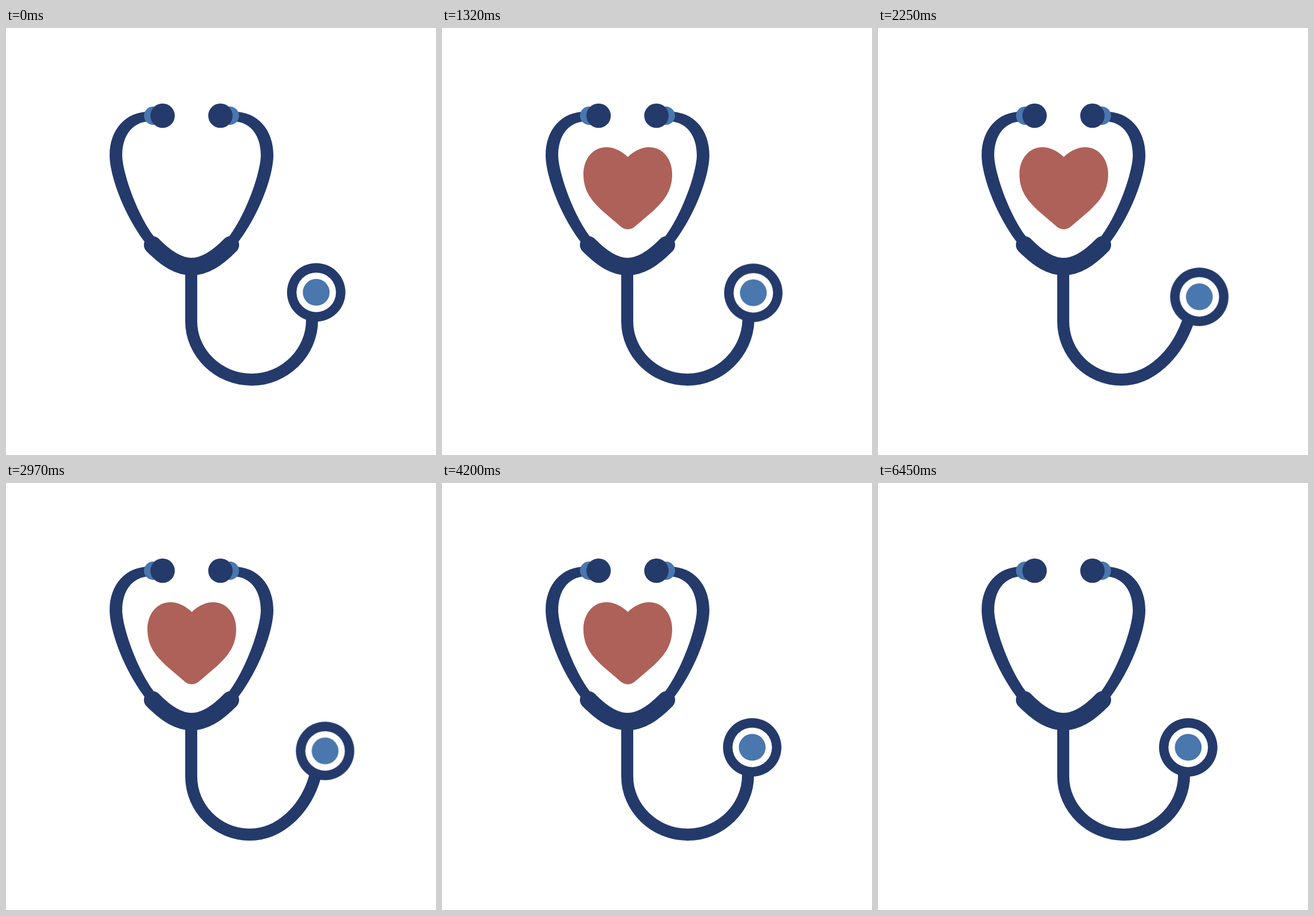
An HTML page for the animation above (7200 ms loop, 751 by 745 pixels).

```html
<!DOCTYPE html>
<html lang="en">
<head>
<meta charset="utf-8">
<title>Stethoscope</title>
<style>
  html, body { margin: 0; width: 100%; height: 100%; overflow: hidden; background: #fff; }
  svg { display: block; width: 100%; height: 100%; }
  .navy { fill: #243a6b; }
  .blue { fill: #4a77ae; }
  .line { fill: none; stroke: #243a6b; }

  .heart {
    fill: #ae6158;
    transform-origin: 324.5px 279.5px;
    animation: pop 7.2s infinite;
  }
  .disc { animation: swing 7.2s infinite; }
  .tube { stroke-width: 21; animation: bend 7.2s infinite; }

  @keyframes pop {
    0%      { transform: scale(0); }
    6.25%   { transform: scale(0); animation-timing-function: cubic-bezier(.61, 1, .88, 1); }
    12.5%   { transform: scale(1.2); animation-timing-function: cubic-bezier(.12, 0, .39, 0); }
    18.333% { transform: scale(1); }
    81.25%  { transform: scale(1); animation-timing-function: cubic-bezier(.61, 1, .88, 1); }
    85.417% { transform: scale(1.19); animation-timing-function: cubic-bezier(.12, 0, .39, 0); }
    89.583%, 100% { transform: scale(0); }
  }
  @keyframes swing {
    0%, 14.583%, 58.333%, 100% {
      transform: translate(0, 0);
      animation-timing-function: cubic-bezier(.37, 0, .63, 1);
    }
    33.333% {
      transform: translate(20px, 8px);
      animation-timing-function: cubic-bezier(.37, 0, .63, 1);
    }
  }
  @keyframes bend {
    0%, 14.583%, 58.333%, 100% {
      d: path("M323.5 425L323.5 512C323.5 567 371 613.5 429 613.5C487 613.5 534.5 566 534.5 510L534.5 501");
      animation-timing-function: cubic-bezier(.37, 0, .63, 1);
    }
    33.333% {
      d: path("M323.5 425L323.5 512C323.5 567 368 613.5 425 613.5C476 613.5 520 570 541 514L544.5 505");
      animation-timing-function: cubic-bezier(.37, 0, .63, 1);
    }
  }
</style>
</head>
<body>
<svg viewBox="0 0 751 745">
  <defs>
    <g id="arm">
      <path class="navy" d="M250 146C209 146 181 177 181 222C181 258 206 327 245 377L260 366C228 325 203 250 203 222C203 190 219 164 250 163Z"/>
      <circle class="blue" cx="257" cy="153" r="16"/>
      <circle class="navy" cx="273.5" cy="153" r="21.3"/>
    </g>
  </defs>

  <use href="#arm"/>
  <use href="#arm" transform="matrix(-1 0 0 1 648 0)"/>
  <path class="line" stroke-width="30.4" stroke-linecap="round" d="M256 378.5C281 404 302 416.3 324 416.3S367 404 392 378.5"/>

  <path class="line tube" d="M323.5 425L323.5 512C323.5 567 371 613.5 429 613.5C487 613.5 534.5 566 534.5 510L534.5 501"/>
  <g class="disc">
    <circle class="navy" cx="541.8" cy="461.2" r="51"/>
    <circle fill="#fff" cx="541.8" cy="461.2" r="34.5"/>
    <circle class="blue" cx="541.8" cy="461.2" r="23.4"/>
  </g>

  <path class="heart" d="M324.5 225C313 214 300 208 287 208C264 208 247 228 247 255C247 285 262 302 280 319L311 345.5C319 353 330 353 338 345.5L369 319C387 302 402 285 402 255C402 228 385 208 362 208C349 208 336 214 324.5 225Z"/>
</svg>
</body>
</html>
```
